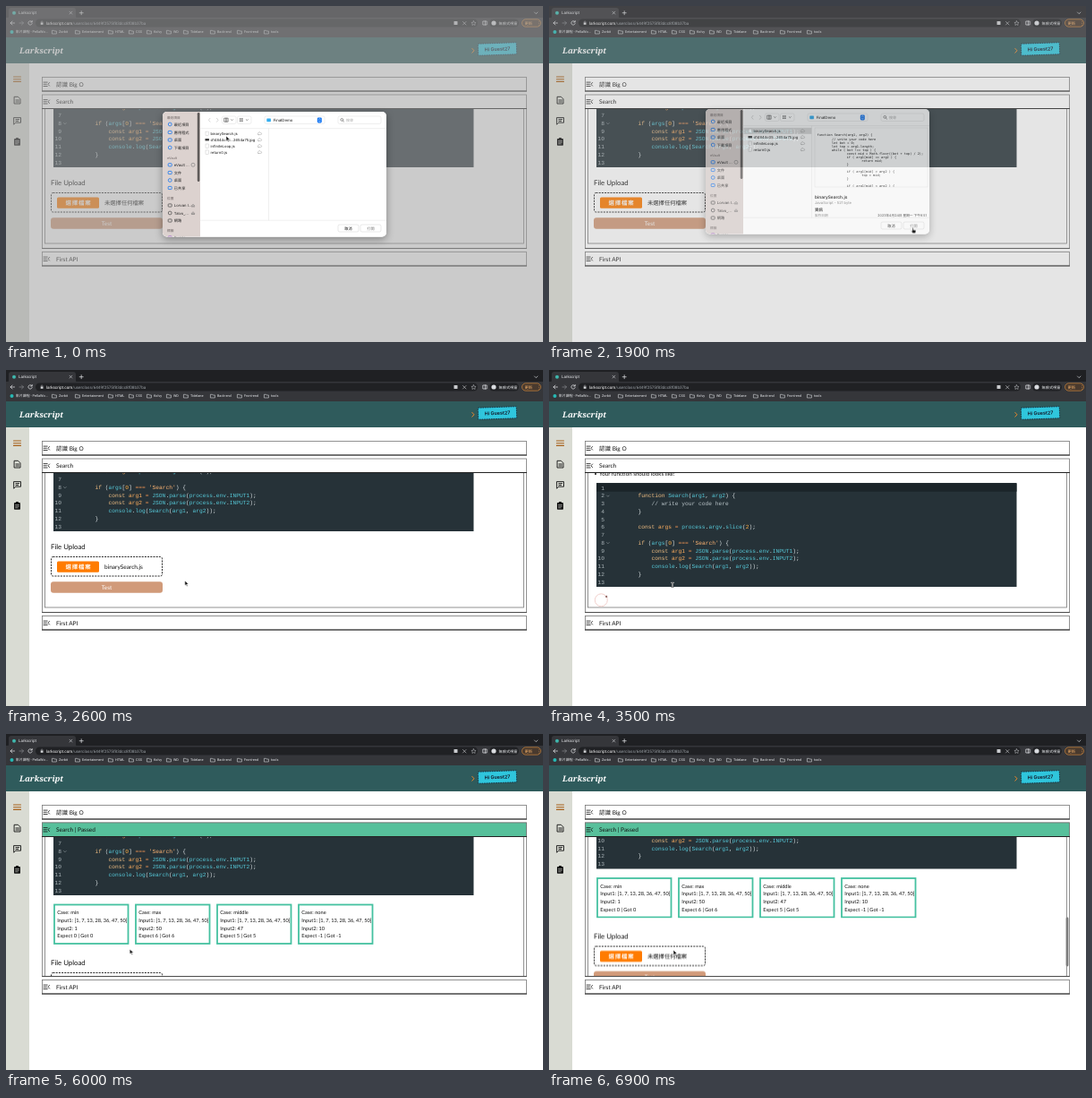
Animation, 600 px wide and 375 px high, one loop 7000 ms. Source, as an HTML page:

```html
<!DOCTYPE html>
<html lang="zh-Hant">
<head>
<meta charset="utf-8">
<title>Larkscript</title>
<style>
html, body { margin: 0; width: 100%; height: 100%; overflow: hidden; background: #fff; }
svg { display: block; width: 100vw; height: 100vh; }
text { white-space: pre; text-rendering: geometricPrecision; }
.page { font-family: Lato, "Noto Sans CJK TC", "Noto Sans CJK", sans-serif; }
.ui { font-family: Roboto, "Noto Sans CJK TC", "Noto Sans CJK", sans-serif; }
.mac { font-family: Inter, "Noto Sans CJK TC", "Noto Sans CJK", sans-serif; }
.code { font-family: "Liberation Mono", Courier, monospace; }
.mini { font-family: "DejaVu Sans Mono", monospace; }
.mark { font-family: "Noto Serif", serif; font-style: italic; font-weight: 700; }
.b { font-weight: 600; }
.mid { text-anchor: middle; }
.end { text-anchor: end; }
.line { fill: none; stroke-linecap: round; stroke-linejoin: round; }
.anim { animation: 7s linear infinite; }
.step { animation-timing-function: step-end; }
</style>
</head>
<body>
<svg id="stage" viewBox="0 0 600 375"></svg>
<script>
const LOOP = 7000;

// Text centred vertically on y
const t = (x, y, size, str, fill = '#111', cls = '') =>
  `<text x="${x}" y="${(y + size * .36).toFixed(2)}" font-size="${size}" fill="${fill}" class="${cls}">${str}</text>`;
const r = (x, y, w, h, fill, more = '') =>
  `<rect x="${x}" y="${y}" width="${w}" height="${h}" fill="${fill}" ${more}/>`;
const p = (d, stroke, w = .8, more = '') =>
  `<path class="line" d="${d}" stroke="${stroke}" stroke-width="${w}" ${more}/>`;
const c = (x, y, rad, fill, more = '') => `<circle cx="${x}" cy="${y}" r="${rad}" fill="${fill}" ${more}/>`;
const anim = (name, body, step = true) =>
  `<g class="anim ${step ? 'step' : ''}" style="animation-name:${name}">${body}</g>`;

// Keyframes from [ms, declarations] rows
const css = [];
const kf = (name, rows) => css.push(`@keyframes ${name}{` + rows.map(([ms, d]) =>
  `${(Math.max(0, ms - 5) / LOOP * 100).toFixed(3)}%{${d}}`).join('') + '}');
const show = (name, from, to) => kf(name, [
  [0, `opacity:${from ? 0 : 1}`], ...(from ? [[from, 'opacity:1']] : []),
  [to, 'opacity:0'], [LOOP + 5, 'opacity:0']]);
const at = (x, y) => `transform:translate(${x}px,${y}px)`;

show('picked', 200, 2400);
show('focus', 200, 1800);
show('preview', 400, 2400);
show('noFile', 0, 2200);
show('hasFile', 2200, 3300);
show('noFile2', 5700, LOOP + 4);
show('busy', 3300, 5700);
show('passed', 5700, LOOP + 4);
show('bar', 6400, LOOP + 4);
kf('form', [[0, 'opacity:1;' + at(0, 0)], [3300, 'opacity:0;' + at(0, 0)],
  [5700, 'opacity:1;' + at(0, 58)], [LOOP + 5, 'opacity:1;' + at(0, 58)]]);
kf('jump', [[0, at(0, 0)], [3300, at(0, 62)], [5700, at(0, 0)], [LOOP + 5, at(0, 0)]]);
kf('scroll', [[0, at(0, 0)], [6300, at(0, 0) + ';animation-timing-function:ease-out'],
  [6900, at(0, -29.5)], [LOOP + 5, at(0, -29.5)]]);
kf('thumb', [[0, at(0, -14)], [6300, at(0, -14) + ';animation-timing-function:ease-out'],
  [6900, at(0, 0)], [LOOP + 5, at(0, 0)]]);
kf('spin', [[0, 'transform:rotate(-157deg)'], [3300, 'transform:rotate(-157deg)'],
  [5700, 'transform:rotate(1283deg)'], [LOOP + 5, 'transform:rotate(1283deg)']]);
kf('scrim', [[0, 'opacity:1'], [1800, 'opacity:1'], [1900, 'opacity:.5'],
  [2300, 'opacity:0'], [LOOP + 5, 'opacity:0']]);
kf('dialog', [[0, 'opacity:1;' + at(0, 0)], [1800, 'opacity:1;' + at(0, 0)],
  [1900, 'opacity:.75;' + at(0, -3)], [2200, 'opacity:0;' + at(0, -6)],
  [LOOP + 5, 'opacity:0;' + at(0, -6)]]);
kf('move', [[0, 246, 145], [300, 246, 145], [600, 318, 215], [800, 376, 250], [1000, 380.5, 252],
  [1300, 380.5, 252], [1700, 406, 247.5], [2000, 406, 247.5], [2300, 207, 236], [2500, 207, 236],
  [2600, 200, 235], [2700, 196, 235], [3100, 138, 240], [5600, 138, 240], [6300, 138.5, 240],
  [6900, 139, 241], [LOOP + 5, 139, 241]].map(([ms, x, y]) => [ms, at(x, y)]));
kf('arrow', [[0, 'opacity:1'], [1600, 'opacity:0'], [2100, 'opacity:1'], [2900, 'opacity:0'],
  [5700, 'opacity:1'], [LOOP + 5, 'opacity:1']]);
kf('hand', [[0, 'opacity:0'], [1600, 'opacity:1'], [2100, 'opacity:0'], [2900, 'opacity:1'],
  [3300, 'opacity:0'], [LOOP + 5, 'opacity:0']]);

function browser() {
  const folders = [[54, 'Zorbit'], [80, 'Entertainment'], [117, 'HTML'], [140, 'CSS'], [160, 'Kolvy'], [182, 'WD'],
    [201, 'Tidelane'], [231, 'Back-end'], [261, 'Front-end'], [291, 'tools']];
  return `<g class="ui">` + r(0, 0, 600, 14, '#1f2023') + r(0, 13, 600, 22, '#35363a') +
    `<path d="M1 14Q3 14 3 11V5Q3 2 6 2H75Q78 2 78 5V11Q78 14 80 14Z" fill="#35363a"/>` +
    c(9, 7.7, 2, '#3fb7ad') + t(14, 7.7, 4.5, 'Larkscript', '#e8eaed') +
    p('M71 6.2l2.8 2.8m0-2.8l-2.8 2.8', '#d5d7da', .6) +
    p('M82.2 7.7h4m-2-2v4', '#e8eaed', .7) + p('M590.5 7l1.7 1.7L594 7', '#d5d7da', .7) +
    r(33, 14.5, 494, 9, '#202124', 'rx="4.5"') +
    p('M9.5 19H5m2-2l-2 2 2 2', '#e8eaed', .7) + p('M15 19h4.5m-2-2l2 2-2 2', '#85878b', .7) +
    p('M29 17.8a2.2 2.2 0 1 0 .2 1.8M29.2 16.4v1.6h-1.6', '#e8eaed', .7) +
    r(38.7, 18.5, 2.8, 2.3, '#d5d7da') + p('M39.3 18.4v-.8a.8.8 0 0 1 1.6 0v.8', '#d5d7da', .4) +
    t(45, 19, 4.6, 'larkscript.com<tspan fill="#9aa0a6">/userclass/6449f2575f83dcc8f08b37ba</tspan>', '#fff') +
    r(500.5, 17, 4, 4, '#c9cbce', 'rx=".6"') + p('M510.5 17.5l3.5 3.5m0-3.5l-3.5 3.5', '#c9cbce', .6) +
    p('M522.5 16.7l.8 1.6 1.8.2-1.3 1.2.3 1.8-1.6-.9-1.6.9.3-1.8-1.3-1.2 1.8-.2z', '#c9cbce', .5) +
    p('M533.2 17h4v4h-4zM535.4 17v4', '#e8eaed', .7) +
    r(540, 14.5, 33, 9, '#202124', 'rx="4.5"') + c(545, 19, 2.6, '#dadce0') + t(550.5, 19, 4.2, '無痕式視窗', '#e8eaed') +
    r(576.5, 14.8, 21, 8.4, '#493a2e', 'rx="4.2" stroke="#e5933d" stroke-width=".6"') +
    t(579.5, 19, 4.3, '更新', '#f6b26b') + t(593, 19, 5, '⋮', '#f6b26b') +
    c(6.5, 29, 2, '#26b8b4') + t(11, 29, 3.9, '影片課程 - PellaWo...', '#e8eaed') +
    folders.map(([x, s]) => p(`M${x - 2.2} 27.3h1.7l.6.7h2.3v3h-4.6z`, '#d5d7da', .6) +
      t(x + 5, 29, 3.8, s, '#e8eaed')).join('') + '</g>';
}

function frame() {
  return r(0, 35, 600, 29, '#2f5b5c') + t(15, 50, 9, 'Larkscript', '#fff', 'mark') +
    p('M520.8 47.4l2.2 2.4-2.2 2.4', '#e8862c', 1) +
    `<g transform="rotate(-2 549 48)">` +
    r(527.5, 41.5, 43, 13, '#2fc6dd', 'stroke="#123" stroke-width=".8" stroke-dasharray="1.6 1"') +
    t(549, 48, 5.4, 'Hi Guest27', '#112', 'mac b mid') + '</g>' +
    r(0, 64, 26, 311, '#d9dbd3') +
    p('M8.5 79h8M8.5 81.7h8M8.5 84.4h8', '#a8621d', 1.1) +
    p('M9.5 101.3h4l2.5 2.5v5.2h-6.5zM11 105h3.5M11 107h3.5', '#111', .9) +
    p('M9 124.6h7.5v5.6h-5.7L9 132zM11 126.6h3.6M11 128.4h2.6', '#111', .9) +
    r(9, 148, 7, 7.8, '#111', 'rx=".8"') + r(11, 147, 3, 1.8, '#111', 'rx=".5"') +
    p('M10.6 150.6h3.8M10.6 152.2h3.8M10.6 153.8h2.4', '#d9dbd3', .6);
}

const heading = (y, str, fill = '#fff') =>
  r(40.5, y, 541, 15.5, fill, 'stroke="#777" stroke-width=".8"') +
  p(`M40.5 ${y + 15.5}h541`, '#222', 1.2) +
  p(`M42 ${y + 5.6}h4.2M42 ${y + 7.8}h3.4M42 ${y + 10}h4.2M48.6 ${y + 6}l-1.7 1.8 1.7 1.8`, '#111', .8) +
  t(56, y + 8, 6.5, str);

const paint = ['#ffb573', '#b9c4c8', '#f0be82', '#ffae5e', '#ff9b55', '#ffad42', '#56c8d8'];
const highlight = s => s.replace(
  /('\w+')|(\/\/.*)|\b(if|const|function)\b|((?<=const )\w+)|(=+)|\b(\d)\b|(\w+)/g,
  (m, ...g) => `<tspan fill="${paint[g.findIndex(v => v === m)]}">${m}</tspan>`);

function editor() {
  const lines = ['', 'function Search(arg1, arg2) {', '    // write your code here', '}', '',
    'const args = process.argv.slice(2);', '', "if (args[0] === 'Search') {",
    '    const arg1 = JSON.parse(process.env.INPUT1);', '    const arg2 = JSON.parse(process.env.INPUT2);',
    '    console.log(Search(arg1, arg2));', '}', ''];
  return c(52, 54, 1, '#111') + t(56, 54, 6.2, 'Your function should looks like:') +
    r(53, 64, 469.5, 116, '#263238') + r(53, 64.7, 469.5, 9, '#1b2429') +
    lines.map((s, i) => {
      const y = 130.5 + (i - 7) * 8.75;
      return t(62, y, 6.25, i + 1, '#aab4b8', 'code end') +
        (s.endsWith('{') ? p(`M64.6 ${y}l1.3 1.3 1.3-1.3`, '#aab4b8', .5) : '') +
        t(99.5, y, 6.25, highlight(s), '#dfe6e8', 'code');
    }).join('');
}

const border = bottom => r(43.5, -200, 535, bottom + 200, 'none', 'stroke="#777" stroke-width=".8"');

function form() {
  const none = t(110, 219.5, 6.3, '未選擇任何檔案');
  return border(265) + t(50, 197.3, 7.8, 'File Upload') +
    r(50.5, 208.5, 124, 21.5, 'none', 'rx="2" stroke="#111" stroke-width=".9" stroke-dasharray="2 1.2"') +
    r(57, 213.5, 47, 12.3, '#ff7b00', 'rx="1.5"') +
    `<g letter-spacing=".9">${t(66.5, 219.5, 6.4, '選擇檔案', '#fff', 'b')}</g>` +
    anim('noFile', none) + anim('noFile2', none) +
    anim('hasFile', t(110, 219.5, 6.5, 'binarySearch.js')) +
    r(50, 236.3, 125, 12.4, '#d19a79', 'rx="3"') + t(112.5, 242.4, 6.4, 'Test', '#fff', 'mid');
}

function results() {
  const cases = [['min', 1, 0], ['max', 50, 6], ['middle', 47, 5], ['none', 10, -1]];
  return cases.map(([name, input, out], i) => {
    const x = 53 + i * 91;
    return r(x + 1, 190.5, 82.5, 43.5, '#fff', 'stroke="#45c1a0" stroke-width="1.8"') +
      [`Case: ${name}`, 'Input1: [1, 7, 13, 28, 36, 47, 50]', `Input2: ${input}`, `Expect ${out} | Got ${out}`]
        .map((s, k) => t(x + 4.3, 199 + k * 8.8, 5.65, s)).join('');
  }).join('');
}

const spinner = border(203) + `<g transform="translate(58.3 194.8)">` +
  c(0, 0, 7, 'none', 'stroke="#f1cfcb" stroke-width="1"') +
  anim('spin', c(7, 0, 1, '#6a3430'), false) + '</g>';

function course() {
  return `<g class="page">` + heading(79.5, '認識 Big O') +
    r(40.5, 114.5, 541, 156, '#fff', 'stroke="#777" stroke-width=".8"') +
    `<g clip-path="url(#pane)">` + anim('scroll', anim('jump',
      editor() + anim('form', form()) + anim('busy', spinner) + anim('passed', results())), false) +
    anim('bar', anim('thumb', r(577.6, 204.5, 2.8, 55, '#7c7c7c', 'rx="1.4"'), false)) + '</g>' +
    p('M40.5 270.5h541', '#444', .9) + heading(99, 'Search') +
    anim('passed', heading(99, 'Search | Passed', '#57c09b')) + heading(274.5, 'First API') + '</g>';
}

function sidebar() {
  const blue = '#1677f2', grey = '#555';
  const heads = [[125, '最近項目'], [170, 'eVault'], [215, '位置'], [251, '標籤']];
  const rows = [[132, '最近項目', blue], [141, '應用程式', blue], [149.5, '桌面', blue], [158, '下載項目', blue],
    [177.3, 'eVault ...', blue], [186, '文件', blue], [194.5, '桌面', blue], [203, '已共享', blue],
    [222.5, 'Lorvan I...', grey], [231, 'Talvo_...', grey], [239.5, '網路', grey], [258.5, 'Purple', '#9b59c6']];
  return r(175, 118, 42, 140, '#dcd2cf') +
    heads.map(([y, s]) => t(180, y, 3.7, s, '#8b8281', 'b')).join('') +
    rows.map(([y, s, col], i) => (i % 3 ? r(181.2, y - 1.6, 4, 3.2, 'none', `rx=".7" stroke="${col}" stroke-width=".8"`)
      : c(183.2, y, 1.9, 'none', `stroke="${col}" stroke-width=".8"`)) + t(187.8, y, 4.2, s, '#222')).join('') +
    c(209, 177.3, 2, 'none', 'stroke="#777" stroke-width=".6"') +
    [222.5, 231].map(y => p(`M207.4 ${y + .4}l1.6-1.7 1.6 1.7zM207.4 ${y + 1.5}h3.2`, '#666', .5)).join('') +
    r(213.8, 119, 2.6, 77, '#5e5a59', 'rx="1.3"');
}

const cloud = (y, col) => p(`M282 ${y + 1.3}h2.6a1 1 0 0 0 0-2 1.5 1.5 0 0 0-2.8.2 1 1 0 0 0 .2 1.8z`, col, .4);

function preview() {
  const lines = ['0function Search(arg1, arg2) {', '1// write your code here', '1let bot = 0;', '1let top = arg1.length;',
    '1while ( bot !== top ) {', '2const mid = Math.floor((bot + top) / 2);', '2if ( arg1[mid] == arg2 ) {',
    '3return mid;', '2}', '0', '2if ( arg1[mid] &gt; arg2 ) {', '3top = mid;', '2}', '0', '2if ( arg1[mid] &lt; arg2 ) {'];
  return r(297, 139, 126, 66, '#fff', 'stroke="#e2e2e2" stroke-width=".5"') + `<g clip-path="url(#sheetCode)">` +
    lines.map((s, i) => t(299.5 + s[0] * 16.6, 147.2 + i * 4.05, 3.55, s.slice(1), '#111', 'mini')).join('') + '</g>' +
    t(297, 216, 4.8, 'binarySearch.js', '#111', 'b') + t(297, 222.7, 4.1, 'JavaScript - 521 byte', '#777') +
    t(297, 230, 4.4, '資訊', '#111', 'b') + t(297, 237, 3.7, '製作日期', '#777') +
    t(422, 237, 3.7, '2023年4月24日 星期一 下午9:51', '#222', 'end');
}

function dialog() {
  const files = ['binarySearch.js', 'd14844c05…2654a75.jpg', 'infiniteLoop.js', 'return0.js'];
  const btn = (x, s, col) => r(x, 244, 23, 8, '#fff', 'rx="1.8" stroke="#d0d0d0" stroke-width=".5"') +
    t(x + 11.5, 248, 4.2, s, col, 'mid');
  return `<g class="mac">` + r(175, 118, 250, 139.5, '#fff', 'rx="5" filter="url(#shade)"') +
    `<g clip-path="url(#sheet)">` + r(175, 118, 250, 140, '#fff') + sidebar() +
    p('M217 136.7h208', '#dedede', .5) + p('M293.5 137v102M217 239.2h208', '#e0e0e0', .5) +
    p('M228 125.3l-1.6 2 1.6 2M235.5 125.3l1.6 2-1.6 2', '#bbb', .6) +
    r(241.5, 123, 15.5, 8.5, '#fff', 'rx="1.6" stroke="#ddd" stroke-width=".5"') +
    p('M244 125.2h4.2v4H244zM245.4 125.2v4M246.8 125.2v4M251.5 126.7l1 1 1-1', '#444', .55) +
    r(258.5, 123, 15.5, 8.5, '#fff', 'rx="1.6" stroke="#ddd" stroke-width=".5"') +
    p('M261.2 126h3.8M261.2 128.3h3.8', '#444', 1.4, 'stroke-dasharray="1.2 .9" style="stroke-linecap:butt"') +
    p('M268.3 126.7l1 1 1-1', '#444', .55) +
    r(289, 123, 67, 8.5, '#fff', 'rx="1.8" stroke="#ddd" stroke-width=".5"') +
    r(291.3, 125.5, 4.6, 3.7, '#35aef0', 'rx=".6"') + t(298.8, 127.3, 4.3, 'FinalDemo') +
    r(347.8, 124.4, 5, 6, '#1677f2', 'rx="1.3"') + p('M349.3 126.6l1-1 1 1M349.3 128.2l1 1 1-1', '#fff', .5) +
    r(371, 123, 48, 8.5, '#fff', 'rx="1.8" stroke="#ddd" stroke-width=".5"') +
    c(375.3, 126.9, 1.4, 'none', 'stroke="#555" stroke-width=".6"') + p('M376.4 128l1.2 1.2', '#555', .6) +
    t(380, 127.3, 4, '搜尋', '#aaa') +
    anim('picked', r(217.5, 138.8, 76, 7, '#d9d9d9')) +
    files.map((s, i) => {
      const y = 142.3 + i * 6.95;
      return (i === 1 ? r(222.5, y - 1.2, 4.4, 2.4, '#3a3a3a')
        : r(223, y - 2.2, 3.4, 4.4, '#fff', 'stroke="#bbb" stroke-width=".4"')) +
        t(228.6, y, 4.1, s) + cloud(y, '#888');
    }).join('') +
    btn(371, '取消', '#111') + btn(396, '打開', '#777') +
    anim('focus', r(217.5, 138.8, 76, 7, '#0a5fd9') +
      r(223, 140.1, 3.4, 4.4, '#fff') + t(228.6, 142.3, 4.1, files[0], '#fff') + cloud(142.3, '#fff') +
      r(396, 244, 23, 8, '#0f6ff5', 'rx="1.8"') + t(407.5, 248, 4.2, '打開', '#fff', 'mid')) +
    anim('preview', preview()) + '</g></g>';
}

function cursor() {
  const outline = 'stroke="#fff" stroke-width=".6" stroke-linejoin="round"';
  return anim('move',
    anim('arrow', `<path d="M0 0V5.6L1.3 4.4 2.2 6.4 3.2 6 2.3 4.1H4Z" fill="#000" ${outline}/>`) +
    anim('hand', `<path d="M0 0Q.6-.6 1.1 0V2.2L3.6 2.8Q4.2 3 4 3.9L3.5 6H.4L-1.6 3.4Q-1.2 2.6 0 3.6Z" fill="#111" ${outline}/>`) +
    anim('busy', p('M-1.2-2.6Q0-2.6 0-1.8Q0-2.6 1.2-2.6M0-1.8V1.8M-1.2 2.6Q0 2.6 0 1.8Q0 2.6 1.2 2.6', '#fff', 1.3) +
      p('M-1.2-2.6Q0-2.6 0-1.8Q0-2.6 1.2-2.6M0-1.8V1.8M-1.2 2.6Q0 2.6 0 1.8Q0 2.6 1.2 2.6', '#222', .6)), false);
}

const defs = `<defs>
<clipPath id="pane">${r(41, 114.5, 540, 156, '#000')}</clipPath>
<clipPath id="sheet">${r(175, 118, 250, 139.5, '#000', 'rx="5"')}</clipPath>
<clipPath id="sheetCode">${r(297, 139, 126, 66, '#000')}</clipPath>
<filter id="shade" x="-10%" y="-10%" width="120%" height="130%">
<feDropShadow dx="0" dy="3" stdDeviation="4" flood-opacity=".35"/></filter></defs>`;

const style = document.createElement('style');
style.textContent = css.join('\n');
document.head.append(style);
document.getElementById('stage').innerHTML = defs + r(0, 0, 600, 375, '#fff') + browser() + frame() + course() +
  anim('scrim', r(0, 0, 600, 375, '#a0a0a0', 'fill-opacity=".55"'), false) +
  anim('dialog', dialog(), false) + cursor();
</script>
</body>
</html>
```
